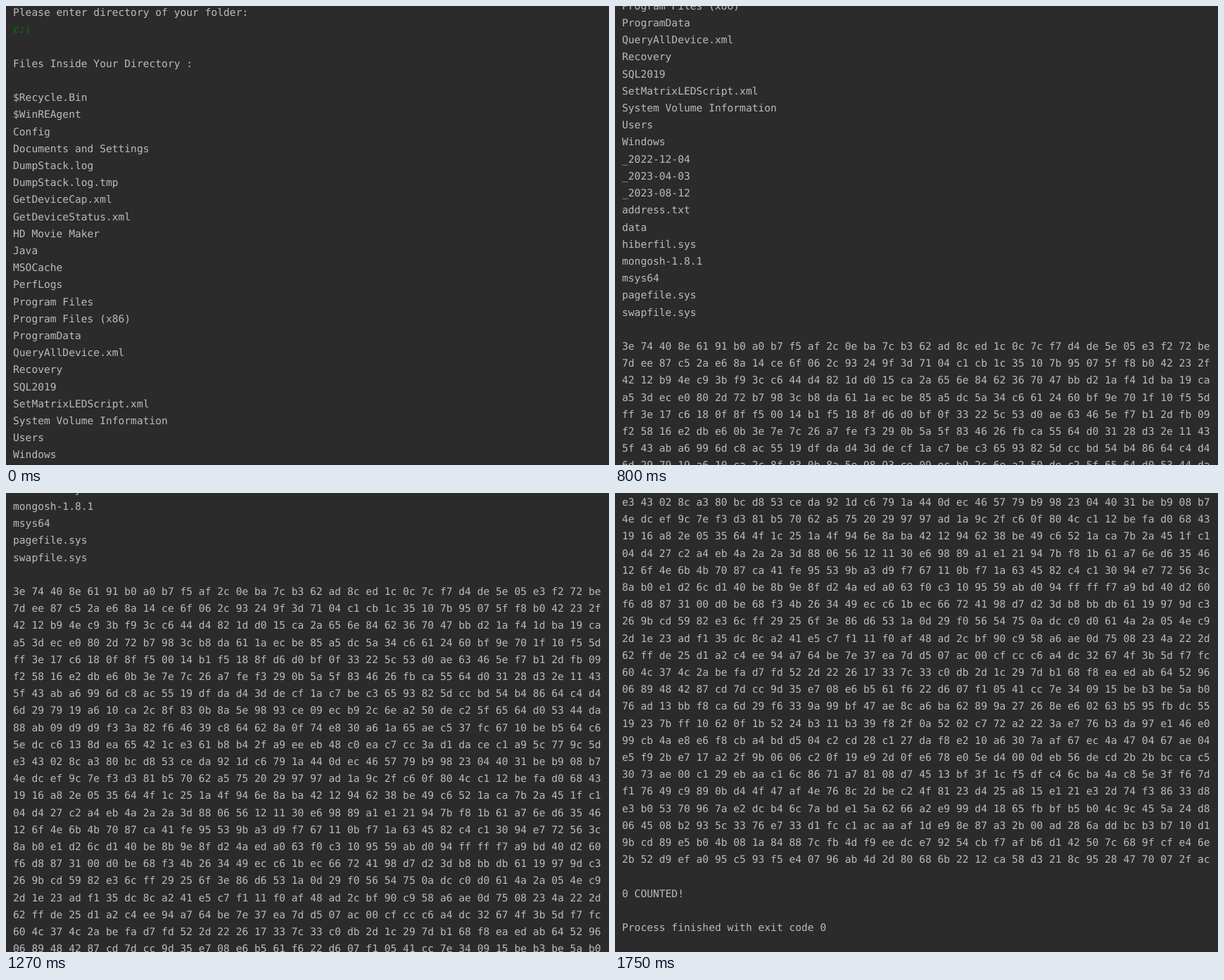
Write an HTML page that moves like this. It is 857 px wide and 653 px high and loops after 1820 ms.

```html
<!DOCTYPE html>
<html lang="en">
<head>
<meta charset="utf-8">
<title>Console output</title>
<style>
html, body { margin: 0; width: 100%; height: 100%; overflow: hidden; background: #2b2b2b; }
main { position: fixed; inset: 0; overflow: hidden; contain: strict; }
pre {
  position: absolute; left: 10px; top: -1.8px; margin: 0;
  font: 14.617px/24.2px "DejaVu Sans Mono", monospace;
  text-rendering: geometricPrecision;
  font-variant-ligatures: none;
  color: #bbb;
}
i { color: #007f00; }
</style>
</head>
<body>
<main>
<pre id="log">
Please enter directory of your folder:
<i>c:\</i>

Files Inside Your Directory :

$Recycle.Bin
$WinREAgent
Config
Documents and Settings
DumpStack.log
DumpStack.log.tmp
GetDeviceCap.xml
GetDeviceStatus.xml
HD Movie Maker
Java
MSOCache
PerfLogs
Program Files
Program Files (x86)
ProgramData
QueryAllDevice.xml
Recovery
SQL2019
SetMatrixLEDScript.xml
System Volume Information
Users
Windows
_2022-12-04
_2023-04-03
_2023-08-12
address.txt
data
hiberfil.sys
mongosh-1.8.1
msys64
pagefile.sys
swapfile.sys

<span id="dump"></span>

0 COUNTED!

Process finished with exit code 0
</pre>
</main>
<script>
const log = document.getElementById('log');
const LOOP = 1820, STEP = 67.2, LEAD = 16, LAST = 26;
// [step, scroll offset in px]
const keys = [[0, 0], [5, 176], [8, 290], [12, 445], [16, 616], [21, 905], [LAST, 1158]];

// Seeded random bytes, 32 rows of 32
let seed = 24;
function hexByte() {
  seed = (seed * 1664525 + 1013904223) % 2 ** 32;
  return (seed >>> 24).toString(16).padStart(2, '0');
}
const hexRow = () => Array.from({ length: 32 }, hexByte).join(' ');
document.getElementById('dump').textContent = Array.from({ length: 32 }, hexRow).join('\n');

function slope(i) {
  const [x0, y0] = keys[Math.max(i - 1, 0)];
  const [x1, y1] = keys[Math.min(i + 1, keys.length - 1)];
  return (y1 - y0) / (x1 - x0);
}

// Smooth curve through the keys
function scrollAt(k) {
  let i = 0;
  while (i < keys.length - 2 && k >= keys[i + 1][0]) i++;
  const [x0, y0] = keys[i], [x1, y1] = keys[i + 1];
  const h = x1 - x0, u = (k - x0) / h, v = 1 - u;
  return y0 + (y1 - y0) * u * u * (3 - 2 * u) + h * u * v * (v * slope(i) - u * slope(i + 1));
}

function draw() {
  const ms = performance.now() % LOOP;
  const k = Math.min(LAST, Math.floor((ms + LEAD) / STEP));
  log.style.transform = `translateY(${-Math.round(scrollAt(k))}px)`;
  requestAnimationFrame(draw);
}
draw();
</script>
</body>
</html>
```
